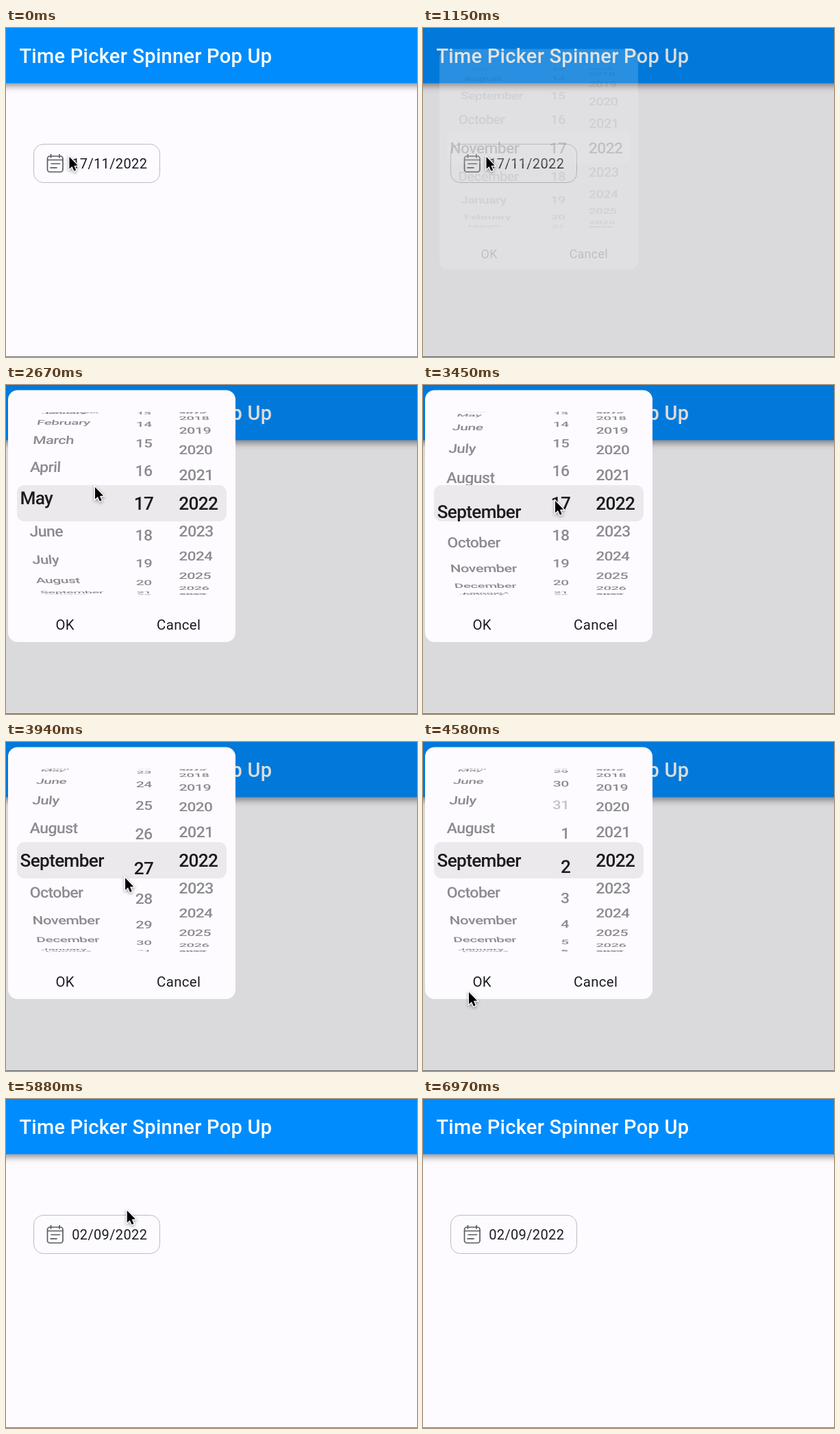
Write an HTML page with a canvas that moves like this. It is 600 px wide and 480 px high and loops after 7 s.

```html
<!DOCTYPE html>
<html lang="en">
<head>
<meta charset="utf-8">
<title>Time Picker Spinner Pop Up</title>
<style>
html, body { margin: 0; width: 100%; height: 100%; overflow: hidden; background: #fdfbff; }
canvas { display: block; width: 600px; height: 480px; }
</style>
</head>
<body>
<canvas id="stage" width="600" height="480"></canvas>
<script>
const ctx = document.getElementById('stage').getContext('2d');
const LOOP = 7000;
const SURFACE = '#fdfbff', INK = '#1b1b1f';
const MONTHS = ['January', 'February', 'March', 'April', 'May', 'June', 'July',
  'August', 'September', 'October', 'November', 'December'];

// Wheel geometry: a cylinder seen in perspective, with a magnified centre band.
const RADIUS = 173.5, PERSPECTIVE = 0.002, CENTER_Y = 172.6, MAGNIFY = 1.119;
const BAND = { x: 16, y: 146, w: 306, h: 53 };
const ROW_FONT = 23.4;
const deg = Math.PI / 180;

const clamp = v => Math.max(0, Math.min(1, v));
const span = (t, from, to) => clamp((t - from) / (to - from));
const smooth = u => u * u * (3 - 2 * u);
const easeOut = (u, power) => 1 - Math.pow(1 - u, power);
const wrap = (i, n) => ((i % n) + n) % n;

function font(weight, size, spacing) {
  ctx.font = `${weight} ${size}px Roboto, sans-serif`;
  ctx.letterSpacing = spacing + 'px';
}

function text(str, x, y, color, align = 'left') {
  ctx.textAlign = align;
  ctx.fillStyle = color;
  ctx.fillText(str, x, y);
}

function roundRect(x, y, w, h, r) {
  ctx.beginPath();
  ctx.roundRect(x, y, w, h, r);
}

function line(x1, y1, x2, y2) {
  ctx.beginPath();
  ctx.moveTo(x1, y1);
  ctx.lineTo(x2, y2);
  ctx.stroke();
}

// ---- page ----
function drawCalendarIcon() {
  ctx.strokeStyle = '#5b5b60';
  ctx.lineWidth = 1.7;
  ctx.lineCap = 'round';
  roundRect(60.5, 187, 22.5, 23, 3.5);
  ctx.stroke();
  line(65.5, 184.5, 65.5, 189);
  line(78, 184.5, 78, 189);
  line(61, 192.5, 82.5, 192.5);
  line(66, 198, 78.5, 198);
  line(65, 203.8, 74, 203.8);
}

function drawPage(date) {
  ctx.fillStyle = SURFACE;
  ctx.fillRect(0, 0, 600, 480);

  ctx.save();
  ctx.shadowColor = 'rgba(0,0,0,.42)';
  ctx.shadowBlur = 9;
  ctx.shadowOffsetY = 4;
  ctx.fillStyle = '#008cfd';
  ctx.fillRect(-20, -20, 640, 100.5);
  ctx.restore();

  font(500, 29, 0.25);
  text('Time Picker Spinner Pop Up', 19.5, 51, '#fff');

  ctx.strokeStyle = '#bcbabd';
  ctx.lineWidth = 1;
  roundRect(40.5, 169.5, 184, 56, 14);
  ctx.stroke();
  drawCalendarIcon();
  font(400, 20, 0.36);
  text(date, 96.2, 205.2, INK);

  ctx.fillStyle = '#77767a';
  ctx.fillRect(0, 479, 600, 1);
}

// ---- wheels ----
function drawRows(col, alpha) {
  for (let i = Math.ceil(col.pos - 90 * deg / col.step); i <= col.pos + 90 * deg / col.step; i++) {
    const angle = (i - col.pos) * col.step;
    const sin = Math.sin(angle), cos = Math.cos(angle);
    const w = 1 + PERSPECTIVE * RADIUS * (1 - cos);
    const label = col.label(i);
    const width = ctx.measureText(label).width;
    const left = col.right ? col.right - width : col.left;
    const mid = left + width / 2 - col.axis;
    const shear = -mid * PERSPECTIVE * sin / (w * w);
    const squash = cos / w - RADIUS * PERSPECTIVE * sin * sin / (w * w);

    ctx.save();
    ctx.transform(1 / w, 0, shear, squash, col.axis + mid / w, CENTER_Y + RADIUS * sin / w);
    ctx.globalAlpha *= alpha * (col.valid && !col.valid(i) ? 0.5 : 1);
    text(label, -width / 2, ROW_FONT * 0.3415, INK);
    ctx.restore();
  }
}

function drawWheel(col) {
  font(500, ROW_FONT, -0.6);
  ctx.save();
  ctx.beginPath();
  ctx.rect(0, 8, 340, BAND.y - 8);
  ctx.rect(0, BAND.y + BAND.h, 340, 130);
  ctx.clip();
  drawRows(col, 0.5);
  ctx.restore();

  ctx.save();
  ctx.beginPath();
  ctx.rect(BAND.x, BAND.y, BAND.w, BAND.h);
  ctx.clip();
  ctx.translate(col.axis, CENTER_Y);
  ctx.scale(MAGNIFY, MAGNIFY);
  ctx.translate(-col.axis, -CENTER_Y);
  drawRows(col, 1);
  ctx.restore();
}

function drawPopup(t, shown) {
  const monthPos = 10 + 10 * easeOut(span(t, 2092, 3744), 2.2);
  const dayPos = 17 + 16 * easeOut(span(t, 3600, 4860), 3);
  const daysInMonth = new Date(2022, wrap(Math.round(monthPos), 12) + 1, 0).getDate();
  const dayOf = i => wrap(i - 1, 31) + 1;
  const scale = 0.85 + 0.15 * shown;

  ctx.save();
  ctx.globalAlpha = shown;
  ctx.translate(169, 191);
  ctx.scale(scale, scale);
  ctx.translate(-169, -191);

  ctx.fillStyle = SURFACE;
  roundRect(3, 7.5, 332, 367.5, 14);
  ctx.fill();
  ctx.fillStyle = '#ebe9ec';
  roundRect(BAND.x, BAND.y, BAND.w, BAND.h, 11);
  ctx.fill();

  drawWheel({ pos: monthPos, step: 16 * deg, axis: 140, left: 33.3,
    label: i => MONTHS[wrap(i, 12)] });
  drawWheel({ pos: dayPos, step: 16 * deg, axis: 202, right: 213.8,
    label: i => String(dayOf(i)), valid: i => dayOf(i) <= daysInMonth });
  drawWheel({ pos: 2022, step: 13.85 * deg, axis: 253, left: 252.4, label: String });

  font(400, 20.4, 0.36);
  text('OK', 86.2, 357.2, INK, 'center');
  text('Cancel', 252.2, 357.2, INK, 'center');
  ctx.restore();
}

// ---- pointer ----
const POINTER_PATH = [
  [0, 92.5, 188], [1580, 92.5, 188], [2000, 77, 143], [2280, 77, 143],
  [2670, 130, 149], [3400, 193, 169], [3760, 193, 169], [4500, 67, 364],
  [4600, 67, 365], [4900, 78, 352], [5380, 78, 352], [5830, 170, 165], [6520, 604, 14]
];

function drawPointer(t) {
  const next = POINTER_PATH.findIndex(p => p[0] > t);
  if (next < 1) return;
  const [t0, x0, y0] = POINTER_PATH[next - 1], [t1, x1, y1] = POINTER_PATH[next];
  const u = smooth(span(t, t0, t1));

  ctx.save();
  ctx.translate(x0 + (x1 - x0) * u, y0 + (y1 - y0) * u);
  ctx.beginPath();
  [[0, 0], [0, 17.6], [4, 14], [6.9, 20.6], [9.7, 19.4], [6.9, 12.9], [12.2, 12.6]]
    .forEach(([x, y]) => ctx.lineTo(x, y));
  ctx.closePath();
  ctx.lineJoin = 'miter';
  ctx.lineWidth = 2.6;
  ctx.strokeStyle = '#fff';
  ctx.shadowColor = 'rgba(0,0,0,.4)';
  ctx.shadowBlur = 4;
  ctx.shadowOffsetY = 1.5;
  ctx.stroke();
  ctx.shadowColor = 'transparent';
  ctx.fillStyle = '#000';
  ctx.fill();
  ctx.restore();
}

function render(t) {
  drawPage(t < 5120 ? '17/11/2022' : '02/09/2022');

  const dim = smooth(span(t, 940, 1160)) * (1 - smooth(span(t, 5370, 5680)));
  ctx.fillStyle = `rgba(0,0,0,${0.138 * dim})`;
  ctx.fillRect(0, 0, 600, 480);

  const shown = smooth(span(t, 1080, 1360)) * (1 - smooth(span(t, 5120, 5340)));
  if (shown > 0) drawPopup(t, shown);
  drawPointer(t);
}

function frame() {
  render(performance.now() % LOOP);
  requestAnimationFrame(frame);
}
frame();
</script>
</body>
</html>
```
